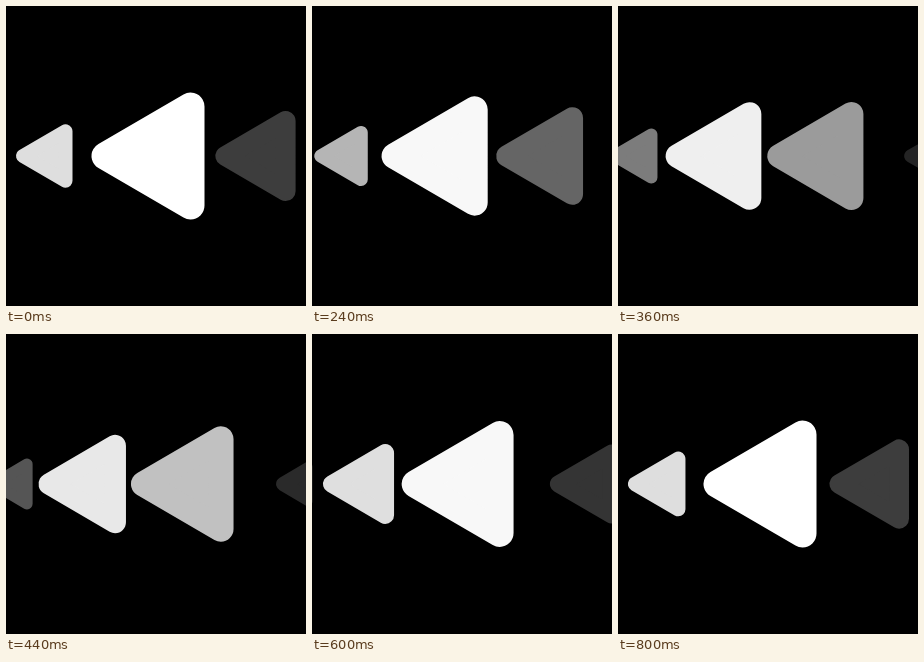
These frames come from a looping animation (300 by 300 pixels, 840 ms). An HTML page:

```html
<!DOCTYPE html>
<html lang="en">
<head>
<meta charset="utf-8">
<title>Rewind arrows</title>
<style>
  html, body { margin: 0; height: 100%; overflow: hidden; background: #000; }
  svg { display: block; width: 100vw; height: 100vh; }
</style>
</head>
<body>
<svg viewBox="0 0 300 300">
  <g id="arrows" stroke-width="28" stroke-linejoin="round"></g>
</svg>
<script>
const LOOP = 840, STEP = 40, START = 66;
const FAST = 600, SLOW = 800;

// Stops along the row: x of the pointed corner, scale, brightness
const exit = { x: -49.6, scale: 0.28, light: 0.08 };
const small = { x: 17, scale: 0.5, light: 0.87 };
const main = { x: 99.5, scale: 1, light: 1 };
const dim = { x: 219.3, scale: 0.71, light: 0.24 };
const entry = { x: 325.2, scale: 0.37, light: 0.1 };

// Each arrow moves one stop to the left per loop
const moves = [
  { from: small, to: exit, x: SLOW, scale: SLOW, light: FAST },
  { from: main, to: small, x: FAST, scale: SLOW, light: FAST },
  { from: dim, to: main, x: FAST, scale: FAST, light: FAST },
  { from: entry, to: dim, x: SLOW, scale: SLOW, light: SLOW },
];

const group = document.getElementById("arrows");
for (const move of moves) {
  move.node = document.createElementNS("http://www.w3.org/2000/svg", "path");
  move.node.setAttribute("d", "M0 0L85 -49.5V49.5Z");
  group.append(move.node);
}

function ease(time, duration) {
  const u = Math.min(1, Math.max(0, (time - START) / duration));
  return u * u * (3 - 2 * u);
}

function draw(now) {
  const time = Math.floor((now % LOOP) / STEP) * STEP;
  for (const move of moves) {
    const value = key =>
      move.from[key] + (move.to[key] - move.from[key]) * ease(time, move[key]);
    const level = Math.round(value("light") * 255);
    const color = `rgb(${level},${level},${level})`;
    move.node.setAttribute("transform", `translate(${value("x")} 150) scale(${value("scale")})`);
    move.node.setAttribute("fill", color);
    move.node.setAttribute("stroke", color);
  }
}

const origin = performance.now();
function tick() {
  draw(performance.now() - origin);
  requestAnimationFrame(tick);
}
tick();
</script>
</body>
</html>
```
